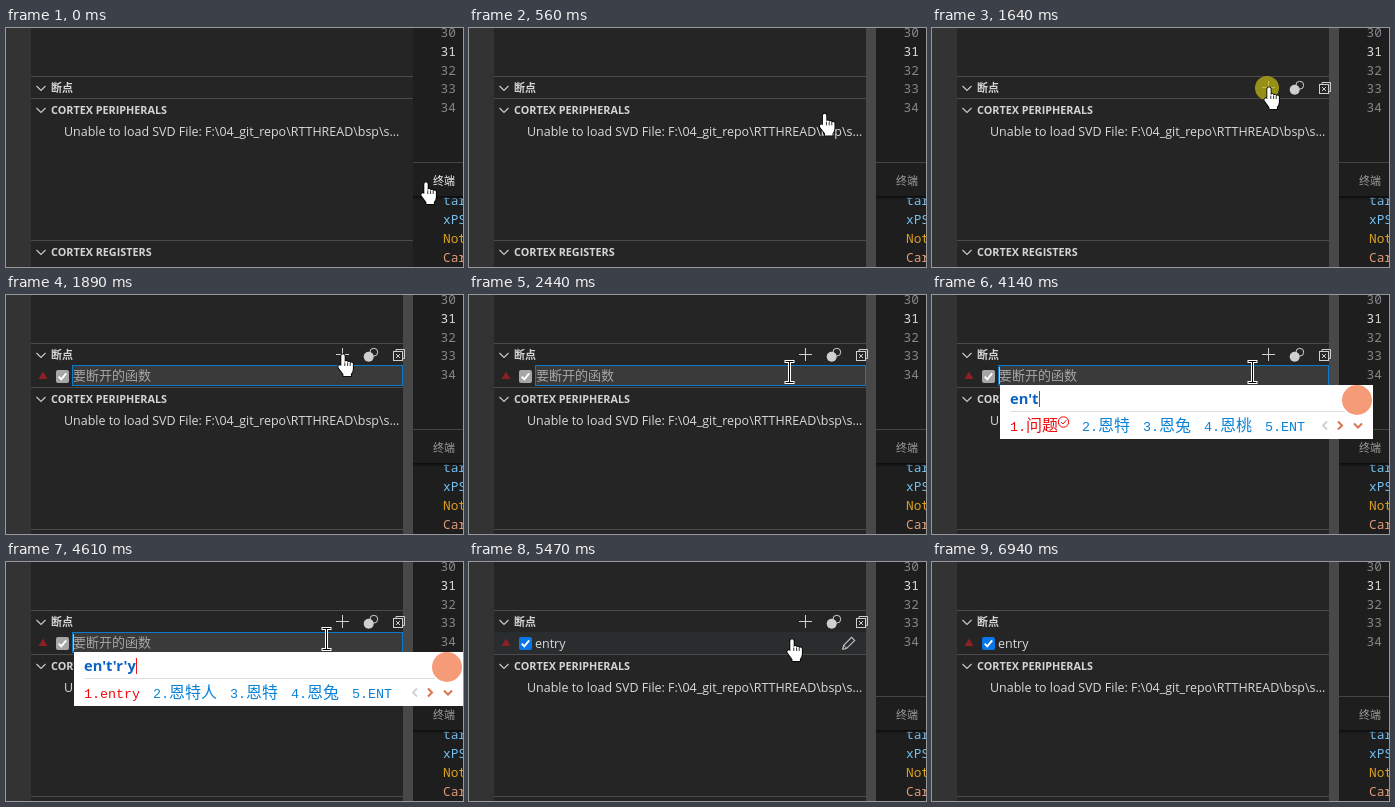
Recreate the animation shown at these times as an HTML page with a canvas. Size 457 by 239 pixels, loop 7260 ms.

```html
<!DOCTYPE html>
<html lang="zh-CN">
<head>
<meta charset="utf-8">
<title>Function breakpoint</title>
<style>
html, body { margin: 0; width: 100%; height: 100%; overflow: hidden; background: #1e1e1e; }
canvas { display: block; width: 457px; height: 239px; }
</style>
</head>
<body>
<canvas id="stage" width="457" height="239"></canvas>
<script>
const ctx = document.getElementById('stage').getContext('2d');
const LOOP = 7260;
const CJK = '"Noto Sans CJK SC", "Noto Sans CJK", "Noto Sans CJK JP", sans-serif';
const UI = '"Open Sans", "Noto Sans", ' + CJK;
const CODE = '"Noto Sans Mono", "DejaVu Sans Mono", monospace';
const CELL = '"Liberation Mono", "DejaVu Sans Mono", ' + CJK;

const HAND = new Path2D('M-1.7 11.5V1a1.7 1.7 0 0 1 3.4 0V7a1.6 1.6 0 0 1 3 .3a1.5 1.5 0 0 1 2.7 .7' +
  'a1.4 1.4 0 0 1 2.5 .8V14q0 2.5-2 5v2h-7.5v-1.8l-4.6-6.2q-1.2-2.2 .6-2.8q1.4 0 2.6 1.3z');
const IBEAM = new Path2D('M-3.5-10.5H3.5M0-10.5V10.5M-3.5 10.5H3.5');

// Composition states: start time, typed letters, candidates, right edge
const IME = [
  { at: 3210, typed: 'e', words: ['额', '饿', 'の', '(⊙o⊙)…', ''], right: 450, rule: 308, more: true },
  { at: 3600, typed: 'en', words: ['嗯', '恩', '摁', '嗯嗯', '蒽'], right: 450, rule: 422 },
  { at: 3980, typed: "en't", words: ['问题', '恩特', '恩兔', '恩桃', 'ENT'], right: 441, rule: 413, badge: true },
  { at: 4310, typed: "en't'r", words: ['恩特人', '恩特', '恩兔', '恩桃', 'ENT'], right: 457, rule: 429 },
  { at: 4540, typed: "en't'r'y", words: ['entry', '恩特人', '恩特', '恩兔', 'ENT'], right: 457, rule: 429 }
];
const ENTER = 200, OPEN = 1800, COMMIT = 4690, ACCEPT = 5470;

// Cursor legs: begin, end, number of jumps, end point
const LEGS = [
  [70, 710, 10, 328, 57],
  [880, 1110, 4, 337, 60],
  [2200, 2440, 4, 321, 77.5],
  [5470, 5470, 1, 323, 78],
  [6560, 6940, 6, 480, 262]
];

function jumps(t, a, b, n) {
  if (t < a) return 0;
  if (t >= b) return 1;
  return (Math.floor((t - a) / (b - a) * (n - 1)) + 1) / n;
}

function cursorAt(t) {
  let x = 420, y = 155;
  for (const [a, b, n, ex, ey] of LEGS) {
    const p = jumps(t, a, b, n);
    x += (ex - x) * p;
    y += (ey - y) * p;
  }
  return { x, y };
}

function rect(x, y, w, h, color) {
  ctx.fillStyle = color;
  ctx.fillRect(x, y, w, h);
}

function text(s, x, y, font, color) {
  ctx.font = font;
  ctx.fillStyle = color;
  ctx.fillText(s, x, y);
}

function line(points, color, width = 1) {
  ctx.beginPath();
  points.forEach(([x, y], i) => i ? ctx.lineTo(x, y) : ctx.moveTo(x, y));
  ctx.strokeStyle = color;
  ctx.lineWidth = width;
  ctx.stroke();
}

function disc(x, y, r, fill, stroke) {
  ctx.beginPath();
  ctx.arc(x, y, r, 0, Math.PI * 2);
  if (fill) { ctx.fillStyle = fill; ctx.fill(); }
  if (stroke) { ctx.strokeStyle = stroke; ctx.lineWidth = 1; ctx.stroke(); }
}

function triangle(x, y, w, h, color) {
  ctx.beginPath();
  ctx.moveTo(x - w / 2, y);
  ctx.lineTo(x + w / 2, y);
  ctx.lineTo(x, y + h);
  ctx.fillStyle = color;
  ctx.fill();
}

function heading(s, y, cjk) {
  rect(25, y, 382, 1, '#4b4b4c');
  line([[30.5, y + 10], [35, y + 14.5], [39.5, y + 10]], '#cccccc', 1.1);
  text(s, 45, y + 16, cjk ? 'bold 11px ' + CJK : 'bold 10.8px ' + UI, '#d4d4d4');
}

function editor(hover) {
  rect(407, 0, 50, 239, '#1e1e1e');
  for (let i = 0; i < 5; i++)
    text(String(30 + i), 434.5, 9 + i * 18.8, '12.8px ' + CODE, i === 1 ? '#dcdcdc' : '#858588');
  rect(407, 134, 50, 1, '#454545');
  text('终端', 427, 157, '500 11px ' + CJK, hover ? '#f4f4f4' : '#9c9c9c');
  ctx.save();
  ctx.beginPath();
  ctx.rect(407, 169, 50, 70);
  ctx.clip();
  [['tar', '#75c0f0'], ['xPS', '#75c0f0'], ['Not', '#dca01e'], ['Car', '#e09a78']]
    .forEach(([s, c], i) => text(s, 437, 177 + i * 19, '12.8px ' + CODE, c));
  ctx.restore();
  const shade = ctx.createLinearGradient(0, 168, 0, 172);
  shade.addColorStop(0, '#0c0c0c');
  shade.addColorStop(1, 'rgba(12,12,12,0)');
  rect(407, 168, 50, 4, shade);
}

function toolbar() {
  const c = '#cfcfcf';
  line([[330, 59.5], [343, 59.5]], c);
  line([[336.5, 53], [336.5, 66]], c);
  disc(367.8, 57.2, 3.9, null, c);
  disc(362.7, 61.8, 5, c);
  line([[390, 56], [390, 54.5], [398.5, 54.5], [398.5, 63.5], [397, 63.5]], c);
  ctx.strokeRect(387.5, 56.5, 9, 9);
  line([[390, 59], [394, 63]], c);
  line([[394, 59], [390, 63]], c);
}

function checkbox(fill) {
  ctx.beginPath();
  ctx.roundRect(50, 75, 13, 13, 2);
  ctx.fillStyle = fill;
  ctx.fill();
  line([[52.7, 81.7], [55.3, 84.4], [60.2, 78.4]], '#ffffff', 1.9);
}

function pencil() {
  const c = '#c5c5c5';
  line([[373.5, 87.5], [374.7, 83.3], [382.6, 75.3], [385.7, 78.4], [377.7, 86.3], [373.5, 87.5]], c, 1.1);
  line([[374.7, 83.3], [377.7, 86.3]], c);
}

function caretOn(t) {
  if (t >= COMMIT) return t < 5150;
  return (t >= 1970 && t < 2440) || (t >= 2510 && t < 2980) || t >= 3210;
}

function breakpointRow(t, hover) {
  const done = t >= ACCEPT;
  if (done && hover) rect(25, 70, 372, 22, '#2a2d2e');
  triangle(37, 84, 9, -7.5, '#8c2024');
  if (done) {
    checkbox('#0a75e8');
    text('entry', 66, 86, '12.5px ' + UI, '#dadada');
    if (hover) pencil();
    return;
  }
  checkbox('#a6a6a6');
  rect(66, 70, 331, 21, '#0a7acb');
  rect(67, 71, 329, 19, '#3a3a3b');
  if (t < COMMIT) text('要断开的函数', 67, 85, '13px ' + CJK, '#a6a6a6');
  else text('entry', 67, 85, '12.5px ' + UI, '#dadada');
  if (caretOn(t)) rect(t < COMMIT ? 67 : 96, 72, 1, 17, '#b9b9b9');
}

// Half-width characters advance 8px, full-width ones 16px
function cells(s, x, y, color) {
  for (const ch of s) {
    const wide = ch > '\u2000';
    text(ch, x, y, wide ? '300 16px ' + CJK : '13.4px ' + CELL, color);
    x += wide ? 16 : 8;
  }
  return x;
}

function popup(state) {
  const { typed, words, right, rule, badge, more } = state;
  rect(68, 90, right - 68, 54, '#ffffff');
  text(typed, 78, 109, 'bold 14.7px ' + UI, '#0b62c4');
  rect(Math.round(78.5 + ctx.measureText(typed).width), 96, 1, 16, '#f01a1a');
  rect(78, 116, rule - 78, 1, '#dedede');
  let x = 78;
  words.forEach((word, i) => {
    x = cells(i + 1 + '.' + word, x, 136, i ? '#0b82d8' : '#f00a0a');
    if (badge && !i) {
      disc(x + 5.5, 127, 5.2, null, '#f00a0a');
      line([[x + 3, 127], [x + 5, 129], [x + 8.5, 125]], '#f00a0a');
      x += 11;
    }
    x += 13;
  });
  if (more) triangle(378, 134, 8, 4.5, '#9a9a9a');
  line([[right - 46, 126.5], [right - 50, 130.5], [right - 46, 134.5]], '#cfcfcf', 1.8);
  line([[right - 35, 126.5], [right - 31, 130.5], [right - 35, 134.5]], '#d9744f', 2);
  line([[right - 19, 128.5], [right - 15, 132.5], [right - 11, 128.5]], '#d9744f', 2);
  disc(right - 16, 105, 15, '#f59b78');
}

function hand() {
  ctx.strokeStyle = '#000000';
  ctx.lineWidth = 1.7;
  ctx.stroke(HAND);
  ctx.fillStyle = '#ffffff';
  ctx.fill(HAND);
  for (const k of [1.8, 4.6, 7.2]) line([[k, 7.5], [k, 11]], '#000000', 0.8);
}

function beam() {
  ctx.lineCap = 'square';
  [['#ffffff', 3], ['#000000', 1]].forEach(([color, width]) => {
    ctx.strokeStyle = color;
    ctx.lineWidth = width;
    ctx.stroke(IBEAM);
  });
}

function cursor({ x, y }, overText) {
  ctx.save();
  ctx.lineJoin = 'round';
  if (overText) {
    ctx.translate(Math.floor(x) - 0.5, Math.floor(y));
    beam();
  } else {
    ctx.translate(x, y);
    hand();
  }
  ctx.restore();
}

function draw(t) {
  const open = t >= OPEN;
  const shift = open ? 22 : 0;
  const pos = cursorAt(t);
  const inPane = pos.x < 398 && pos.y < (open ? 92 : 70) && pos.y > 47;
  const inRow = open && pos.y > 70 && pos.y < 92 && pos.x < 398;

  rect(0, 0, 457, 239, '#252526');
  rect(0, 0, 25, 239, '#333333');
  heading('断点', 48, true);
  if (open) breakpointRow(t, inRow);
  heading('CORTEX PERIPHERALS', 70 + shift);
  text('Unable to load SVD File: F:\\04_git_repo\\RTTHREAD\\bsp\\s...', 58, 108 + shift, '12.46px ' + UI, '#dadada');
  heading('CORTEX REGISTERS', 212 + shift);
  if (t >= ENTER) rect(397, 0, 10, 239, '#484848');
  editor(pos.x > 410 && pos.y > 136 && pos.y < 169);
  if (inPane) toolbar();

  const state = t < COMMIT && IME.filter(s => t >= s.at).pop();
  if (state) popup(state);

  if (t >= 1640 && t < 1730) disc(335, 60, 12, 'rgba(190,180,20,.75)');
  if (t >= 2510 && t < 2660) disc(321, 77, 12, 'rgba(190,180,20,.75)');
  const overText = pos.x > 407 && (pos.y < 134 || pos.y > 169);
  cursor(pos, overText || (inRow && t < ACCEPT));
}

function tick(now) {
  draw(now % LOOP);
  requestAnimationFrame(tick);
}
draw(0);
requestAnimationFrame(tick);
</script>
</body>
</html>
```
